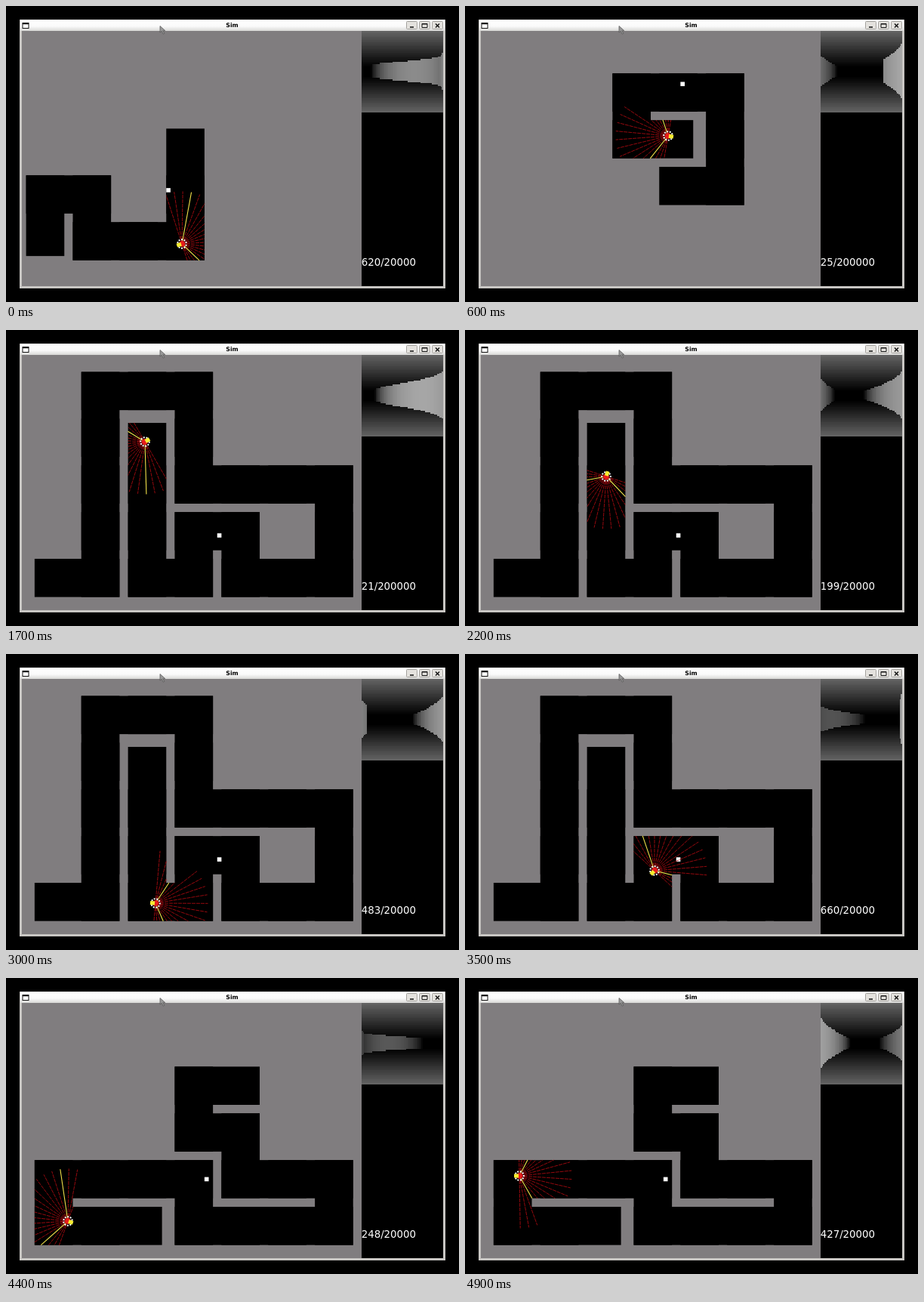
An HTML page with a canvas that plays this animation: 600x392 px, repeating every 5 s.

```html
<!DOCTYPE html>
<html lang="en">
<head>
<meta charset="utf-8">
<title>Sim</title>
<style>
  html, body { margin: 0; width: 100%; height: 100%; overflow: hidden; background: #000; }
  canvas, svg { position: absolute; left: 0; top: 0; width: 600px; height: 392px; }
  text { font-family: "DejaVu Sans", sans-serif; }
</style>
</head>
<body>
<canvas id="stage" width="600" height="392"></canvas>
<svg viewBox="0 0 600 392">
  <defs>
    <linearGradient id="bar" x1="0" y1="0" x2="0" y2="1">
      <stop offset="0" stop-color="#fff"/>
      <stop offset=".6" stop-color="#fafafa"/>
      <stop offset="1" stop-color="#d8d8d6"/>
    </linearGradient>
    <rect id="button" x=".5" y=".5" width="14" height="10" rx="1" fill="#e4e2de" stroke="#a4a29e"/>
  </defs>
  <path d="M18 18h564v356h-564zM21 33v338h558v-338z" fill="#c8c6c3" fill-rule="evenodd"/>
  <rect x="19" y="18" width="562" height="15" fill="url(#bar)"/>
  <rect x="22" y="22.5" width="8" height="7" fill="#fff" stroke="#111"/>
  <path d="M22 23.5h8" stroke="#111" stroke-width="1.5"/>
  <text x="299.5" y="28.3" font-size="7.8" font-weight="bold" text-anchor="middle">Sim</text>
  <use href="#button" x="530" y="20"/>
  <use href="#button" x="547" y="20"/>
  <use href="#button" x="564" y="20"/>
  <g fill="none" stroke="#111">
    <path d="M535 28h5M569 23.5l5 5m0-5l-5 5" stroke-width="1.5"/>
    <path d="M551 23.5h7v5h-7zM551 24h7"/>
  </g>
  <path d="M204 26.5v8.5l2.2-1.800 2 4 1.600-.8-1.900-3.800h2.900z" fill="#999" stroke="#555" stroke-width=".7"/>
  <text id="count" x="470.7" y="344" font-size="13.33" fill="#fff"></text>
</svg>
<script>
const LOOP = 5000, STEP = 100;
const LEFT = 21, TOP = 33, CELL = 5.625, COLS = 80;
const HALL = 9, PITCH = 11, SPEED = 0.16;
const REACH = 69.5, RAYS = 20, VIEW = 64, FOV = 120, WALL = 820;
const RED = '#ba0c12', YELLOW = '#f2e24a', GREY = '#807d7f';
const DIRS = { U: [0, -1], D: [0, 1], L: [-1, 0], R: [1, 0] };

// walk: corridor from its first cell; keys: time, x, y, heading
const scenes = [
  {
    count: 620, rate: 35.5, goal: [34, 37], cell: [1, 45], walk: 'URDRRUU',
    keys: [[0, 233, 315, -18], [500, 221, 250, -150]]
  },
  {
    count: 25, rate: 35.5, goal: [47, 12], cell: [42, 21], walk: 'LURRDDL',
    keys: [[600, 269, 172, 190], [1200, 215, 112, 271], [1600, 278, 102, 5]]
  },
  {
    count: 21.5, rate: 35.5, goal: [46, 42], cell: [25, 15], walk: 'DDDRURDRRUULLLUULLDDDDL',
    keys: [[1700, 184, 148, 150], [2200, 187, 194, 108], [2700, 184, 284, 80],
           [3000, 198, 330, 5], [3700, 276, 272, -10]]
  },
  {
    count: 34, rate: 35.75, goal: [43, 41], cell: [25, 48], walk: 'LLURRRDRRRULLULUR',
    keys: [[3800, 169, 324, 185], [4400, 82, 322, 200], [4900, 72, 262, 359]]
  }
];

const ctx = document.getElementById('stage').getContext('2d');
const label = document.getElementById('count');
const eye = document.createElement('canvas');
eye.width = eye.height = VIEW;
const eyeCtx = eye.getContext('2d');

const rad = deg => deg * Math.PI / 180;

// every step of the walk opens one stretch of hall; the first is a cell short
function carve(scene) {
  let [x, y] = scene.cell;
  scene.rooms = [];
  scene.open = new Set();
  [...scene.walk].forEach((step, n) => {
    const [dx, dy] = DIRS[step];
    if (n === 0) { x += dx; y += dy; }
    const len = n ? PITCH : PITCH - 1;
    const rx = Math.min(x, x + dx * len), ry = Math.min(y, y + dy * len);
    const w = HALL + Math.abs(dx) * len, h = HALL + Math.abs(dy) * len;
    scene.rooms.push([rx, ry, w, h]);
    for (let j = ry; j < ry + h; j++)
      for (let i = rx; i < rx + w; i++) scene.open.add(j * COLS + i);
    x += dx * len;
    y += dy * len;
  });
}
scenes.forEach(carve);

// Hermite curve through the keys, facing along the curve
function poseAt(keys, t) {
  const i = Math.max(1, keys.findIndex(k => k[0] >= t));
  const [t0, x0, y0, h0] = keys[i - 1], [t1, x1, y1, h1] = keys[i];
  const s = (t - t0) / (t1 - t0), pull = SPEED * (t1 - t0);
  const curve = (a, b, m, n) => {
    const c = 3 * (b - a) - 2 * m - n, d = 2 * (a - b) + m + n;
    return [a + s * (m + s * (c + s * d)), m + s * (2 * c + 3 * s * d)];
  };
  const [x, vx] = curve(x0, x1, pull * Math.cos(rad(h0)), pull * Math.cos(rad(h1)));
  const [y, vy] = curve(y0, y1, pull * Math.sin(rad(h0)), pull * Math.sin(rad(h1)));
  return { x, y, dir: Math.atan2(vy, vx) * 180 / Math.PI };
}

function cast(scene, pose, deg) {
  const dx = Math.cos(rad(deg)), dy = Math.sin(rad(deg));
  for (let d = 0; d < REACH; d += 0.3) {
    const col = Math.floor((pose.x + dx * d - LEFT) / CELL);
    const row = Math.floor((pose.y + dy * d - TOP) / CELL);
    if (!scene.open.has(row * COLS + col)) return d;
  }
  return REACH;
}

function fillCells(x, y, w, h) {
  ctx.fillRect(LEFT + x * CELL, TOP + y * CELL, w * CELL, h * CELL);
}

function drawMap(scene) {
  ctx.fillStyle = GREY;
  ctx.fillRect(LEFT, TOP, 450, 338);
  ctx.fillStyle = '#000';
  for (const room of scene.rooms) fillCells(...room);
  ctx.fillStyle = '#fff';
  fillCells(...scene.goal, 1, 1);
}

function drawRays(scene, pose) {
  for (let i = 0; i < RAYS; i++) {
    const edge = i === 3 || i === RAYS - 4;
    const deg = pose.dir - 90 + i * 180 / (RAYS - 1);
    const d = cast(scene, pose, deg);
    ctx.strokeStyle = edge ? YELLOW : RED;
    ctx.lineWidth = edge ? 1.1 : 0.8;
    ctx.setLineDash(edge ? [] : [5, 1]);
    ctx.beginPath();
    ctx.moveTo(pose.x, pose.y);
    ctx.lineTo(pose.x + Math.cos(rad(deg)) * d, pose.y + Math.sin(rad(deg)) * d);
    ctx.stroke();
  }
}

function drawRobot({ x, y, dir }) {
  ctx.save();
  ctx.translate(x, y);
  ctx.rotate(rad(dir));
  ctx.fillStyle = '#e81c1c';
  ctx.beginPath();
  ctx.arc(0, 0, 3.8, 0, 7);
  ctx.fill();
  ctx.fillStyle = '#fff';
  for (let i = 0; i < 10; i++) {
    ctx.rotate(Math.PI / 5);
    ctx.fillRect(4.8, -1, 2, 2);
  }
  ctx.fillStyle = '#f6ee30';
  ctx.fillRect(-7, -2.5, 6, 5);
  ctx.restore();
}

function drawEye(scene, pose) {
  const mid = VIEW / 2;
  const shade = (v, x, y, w, h) => {
    const g = Math.max(0, Math.round(v));
    eyeCtx.fillStyle = `rgb(${g},${g},${g})`;
    eyeCtx.fillRect(x, y, w, h);
  };
  for (let y = 0; y < VIEW; y++)
    shade(100 * (Math.abs(y + 0.5 - mid) - 4) / (mid - 4), 0, y, VIEW, 1);
  for (let x = 0; x < VIEW; x++) {
    const rel = ((x + 0.5) / VIEW - 0.5) * FOV;
    const d = cast(scene, pose, pose.dir + rel);
    if (d >= REACH) continue;
    const half = WALL / (d * Math.cos(rad(rel))) * VIEW / 108 / 2;
    const top = Math.max(0, Math.floor(mid - half));
    const bottom = Math.min(VIEW, Math.floor(mid + half));
    shade(245 * (1 - d / REACH), x, top, 1, bottom - top);
  }
  ctx.imageSmoothingEnabled = false;
  ctx.drawImage(eye, 471, TOP, 108, 108);
}

function draw(t) {
  const scene = scenes.findLast(s => s.keys[0][0] <= t);
  const pose = poseAt(scene.keys, t);
  ctx.fillStyle = '#000';
  ctx.fillRect(0, 0, 600, 392);
  drawMap(scene);
  drawRays(scene, pose);
  drawRobot(pose);
  drawEye(scene, pose);
  const n = Math.floor(scene.count + scene.rate * (t - scene.keys[0][0]) / STEP);
  // a shorter number leaves one stale digit behind
  label.textContent = n + (n < 100 ? '/200000' : '/20000');
}

let origin, last = -1;
function tick(now) {
  origin ??= now;
  const t = Math.floor((now - origin) % LOOP / STEP) * STEP;
  if (t !== last) draw(last = t);
  requestAnimationFrame(tick);
}
draw(0);
requestAnimationFrame(tick);
</script>
</body>
</html>
```
